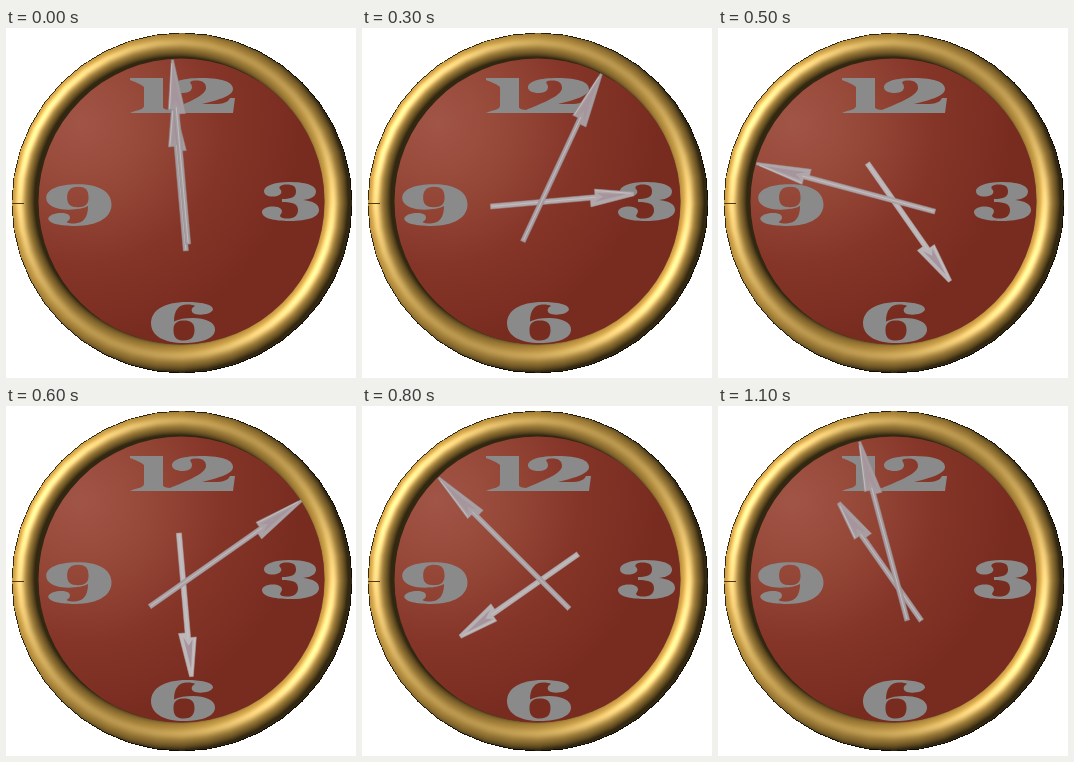
Recreate the animation shown at these times as an HTML page with a canvas. Size 350x350 px, loop 1.2 s.

```html
<!DOCTYPE html>
<html lang="en">
<head>
<meta charset="utf-8">
<title>Spinning clock</title>
<style>
  @property --turn {
    syntax: "<angle>";
    inherits: true;
    initial-value: -5deg;
  }
  html, body {
    margin: 0;
    width: 100%;
    height: 100%;
    overflow: hidden;
    background: #fff;
  }
  canvas, svg {
    position: absolute;
    left: 0;
    top: 0;
    width: 350px;
    height: 350px;
  }
  .numerals { fill: #8b8a8a; fill-rule: evenodd; }
  .hand {
    transform: rotate(var(--turn));
    animation: 1200ms steps(12, end) infinite;
    /* hands brighten as they swing downwards */
    fill: hsl(340 5% calc(68% - 5% * cos(var(--turn))));
    stroke: hsl(340 5% calc(61% - 5% * cos(var(--turn))));
    stroke-width: .5;
    stroke-linejoin: round;
  }
  .facet { fill: #a6959c; stroke: none; }
  .shine { fill: none; stroke: #c9c2c5; stroke-width: .8; }
  .hour { animation-name: hour; }
  .minute { animation-name: minute; }
  @keyframes hour { from { --turn: -5deg; } to { --turn: 355deg; } }
  @keyframes minute { from { --turn: -5deg; } to { --turn: 1555deg; } }
</style>
</head>
<body>
<canvas id="rim" width="350" height="350"></canvas>
<svg viewBox="0 0 350 350" role="img" aria-label="Clock with numerals 12, 3, 6 and 9">
  <defs>
    <path id="six" d="M36 0C12 0 0 9 0 21C0 34 13 41 33 41C52 41 64 36 64 27.5C64 20 54 16 42 16C34 16 28 17 23 19.5C23 8 28 2.5 36 2.5C40 2.5 43 3 44 4C40 6 40 9 42 11C46 14 60 13 62 7.5C62 2 49 0 36 0ZM33 18.5C26 18.5 22.5 21 22.5 28C22.5 36 26 38.5 33 38.5C40 38.5 43.5 35 43.5 28C43.5 21 40 18.5 33 18.5Z"/>
  </defs>
  <g class="numerals">
    <g transform="translate(124 50)">
      <path d="M0 0H33V29C33 31 36 32 42 32V35H0C6 32 14 32 14 28V9C11 6 5 4 0 2Z"/>
      <path d="M40 35V32C54 26 76 18 76 10C76 5 73 2.5 66 2.5C61 2.5 59 4 61 6C64 11 60 15 53 15C46 15 42 12.5 42 9.5C42 3 54 0 72 0C92 0 103 4 103 11C103 18 88 22 72 26H84C94 26 98 24 100 20H105L103 35Z"/>
    </g>
    <path transform="translate(256 154)" d="M27 0C12 0 2 4 2 9C2 13.5 7 15 12 14.5C19 14 21 10 18 7C16 5 19 2.5 24 2.5C32 2.5 34 5 34 9.5C34 15 30 17 20 17V20C31 20 36 22 36 28C36 34 32 36.5 25 36.5C18 36.5 17 34 19 32C22 28 18 24.5 11 24.5C4 24.5 0 27 0 30C0 36 11 39 28 39C46 39 57 35 57 28C57 22 51 19 41 18C50 17 54 14 54 9.5C54 3 43 0 27 0Z"/>
    <use href="#six" x="145" y="274"/>
    <use href="#six" transform="translate(105.5 198) rotate(180) scale(1.02)"/>
  </g>
  <g transform="translate(176.4 175)">
    <g class="hand hour">
      <path d="M-3.3 48H1.9V-52H8.5L1.2-96H-2.6L-9-57H-3.3Z"/>
      <path class="facet" d="M-5-59L-1-88L4-56L-.7-65Z"/>
      <path class="shine" d="M-.7 47V-58M-7.5-58L-1.5-93"/>
    </g>
    <g class="hand minute">
      <path d="M-.3 41.5H4.7V-89H11L3.6-143.5H1.4L-6-94H-.3Z"/>
      <path class="facet" d="M-2-96L2.2-134L6.8-93L2.3-103Z"/>
      <path class="shine" d="M2.2 40V-96M-4.6-95L1.6-140"/>
    </g>
  </g>
</svg>
<script>
const size = 350;
const outer = { x: 176, y: 175, r: 170.5 };
const inner = { x: 175.5, y: 173.5, r: 143 };
const ctx = document.getElementById("rim").getContext("2d");
const clamp = (v, lo, hi) => Math.min(hi, Math.max(lo, v));
const dot = (a, b) => a[0] * b[0] + a[1] * b[1] + a[2] * b[2];

const light = [-.65, -.35, .67];
const half = [-.36, -.19, .91];
const gold = [210, 164, 72];
const glow = [90, 98, 96];
const sides = 40;

// Radius of a regular polygon in the direction of (dx, dy)
function polygonRadius(r, dx, dy) {
  const step = 2 * Math.PI / sides;
  const turn = Math.atan2(dy, dx) + 2 * Math.PI;
  return r * Math.cos(step / 2) / Math.cos(turn % step - step / 2);
}

// Lit tube between the two outlines
const image = ctx.createImageData(size, size);
for (let y = 0; y < size; y++) {
  for (let x = 0; x < size; x++) {
    const dx = x + .5 - outer.x, dy = y + .5 - outer.y;
    const dist = Math.hypot(dx, dy);
    const toOuter = polygonRadius(outer.r, dx, dy) - dist;
    const toInner = Math.hypot(x + .5 - inner.x, y + .5 - inner.y) - inner.r;
    if (toOuter < 0 || toInner < -2) continue;

    const p = clamp((toInner - toOuter) / (toInner + toOuter), -1, 1);
    const normal = [p * dx / dist, p * dy / dist, Math.sqrt(1 - p * p)];
    const diffuse = Math.max(0, dot(normal, light));
    const gloss = Math.max(0, dot(normal, half)) ** 16;
    const edge = toOuter < .8 ? .3 : 1;
    const i = 4 * (y * size + x);
    for (let c = 0; c < 3; c++) {
      image.data[i + c] = edge * (gold[c] * (.24 + .82 * diffuse) + glow[c] * gloss);
    }
    image.data[i + 3] = 255;
  }
}
ctx.putImageData(image, 0, 0);

const red = ctx.createRadialGradient(75, 95, 0, 75, 95, 220);
red.addColorStop(0, "#a15546");
red.addColorStop(.3, "#974939");
red.addColorStop(.65, "#843528");
red.addColorStop(1, "#782c1f");
ctx.fillStyle = red;
ctx.beginPath();
ctx.arc(inner.x, inner.y, inner.r, 0, 2 * Math.PI);
ctx.fill();

// Seam in the rim
ctx.fillStyle = "#4a380f";
ctx.fillRect(6, 175, 12, 1);
</script>
</body>
</html>
```
